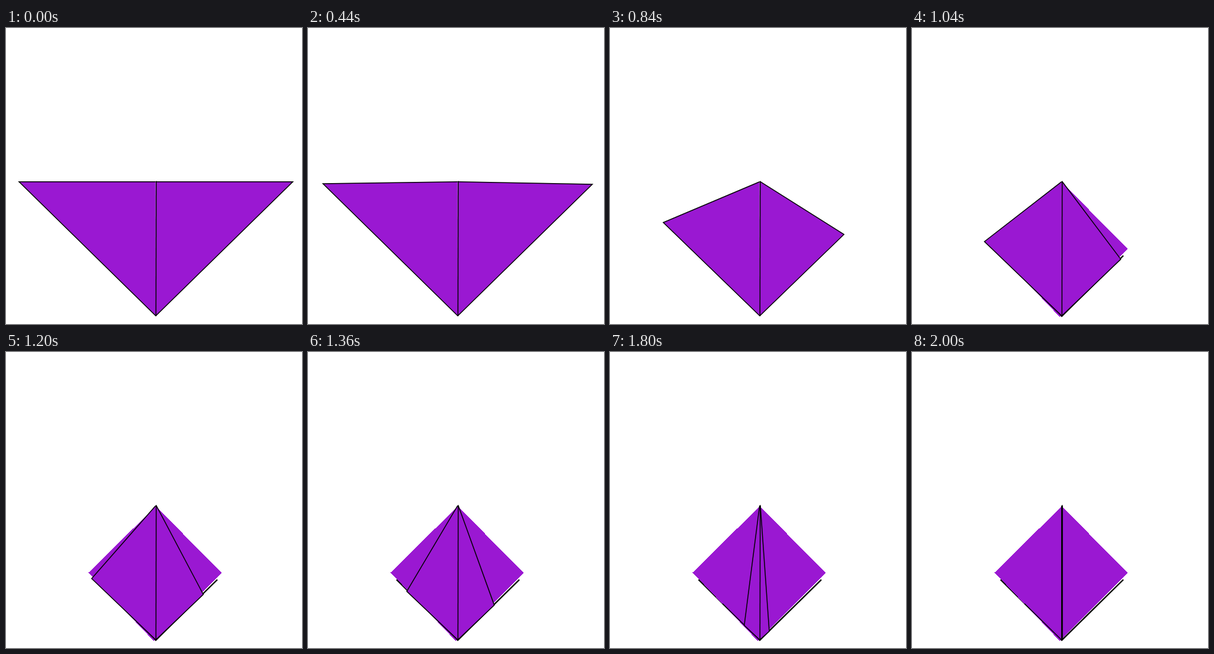
Write an HTML page that moves like this. It is 500 px wide and 500 px high and loops after 2.4 s.

```html
<!DOCTYPE html>
<html lang="en">
<head>
<meta charset="utf-8">
<title>Folding triangle</title>
<style>
  html, body { margin: 0; width: 100%; height: 100%; overflow: hidden; background: #fff; }
  svg { display: block; width: 100%; height: 100%; }
  .paper { fill: #9a18d2; }
  .flap { stroke: #000; stroke-width: 1.5; }
  .edge { fill: none; stroke: #000; stroke-width: 2.4; }
  .crease { fill: none; stroke: #000; stroke-width: 1.5; }
</style>
</head>
<body>
<svg viewBox="0 0 500 500">
  <g id="base">
    <path class="edge" d="M149.5 384.5L253 486.7L357 384.5"/>
    <path class="paper" shape-rendering="crispEdges" d="M253 260.5L364.3 373L253 484.5L249.5 488L139.5 372.5Z"/>
    <path class="crease" d="M190 425L253 486.7"/>
  </g>
  <path id="left" class="paper flap"/>
  <path id="right" class="paper flap"/>
  <path class="crease" d="M253.7 258.5L253.3 487"/>
</svg>
<script>
const LOOP = 2400, HOLD = 400, STEP = 40, KNEE = 16, LAST = 40;
const TOP = 259.7, FOOT = 486.3;

// x: outer corner, hinge: inner side, mid: share folded at the knee, sag: bulge below the edge
const flaps = [
  { id: "left", x: 22, hinge: 252.7, mid: 0.435, ease: 1.03, sag: 2.5 },
  { id: "right", x: 484.5, hinge: 254, mid: 0.572, ease: 1.2, sag: 1.3 }
];

const $ = id => document.getElementById(id);

function folded(k, { mid, ease }) {
  if (k <= KNEE) return mid * Math.max(0, k - 0.5) / (KNEE - 0.5);
  return 1 - (1 - mid) * ((LAST - k) / (LAST - KNEE)) ** ease;
}

function drawFlap(flap, k) {
  const s = folded(k, flap);
  const x = flap.x + (flap.hinge - flap.x) * s;
  const y = TOP + (FOOT - TOP) * s + flap.sag * Math.sin(Math.PI * s);
  $(flap.id).setAttribute("d", `M${flap.hinge} ${TOP}L${x} ${y}L253 ${FOOT}`);
}

function draw(ms) {
  const k = Math.floor((ms % LOOP - HOLD) / STEP);
  const step = Math.max(0, Math.min(LAST, k));
  flaps.forEach(flap => drawFlap(flap, step));
  // The lower layer only shows once the flaps fold past it.
  $("base").style.display = step < KNEE - 1 ? "none" : "";
}

const start = performance.now();
function tick(now) {
  draw(Math.max(0, now - start));
  requestAnimationFrame(tick);
}
tick(start);
</script>
</body>
</html>
```
